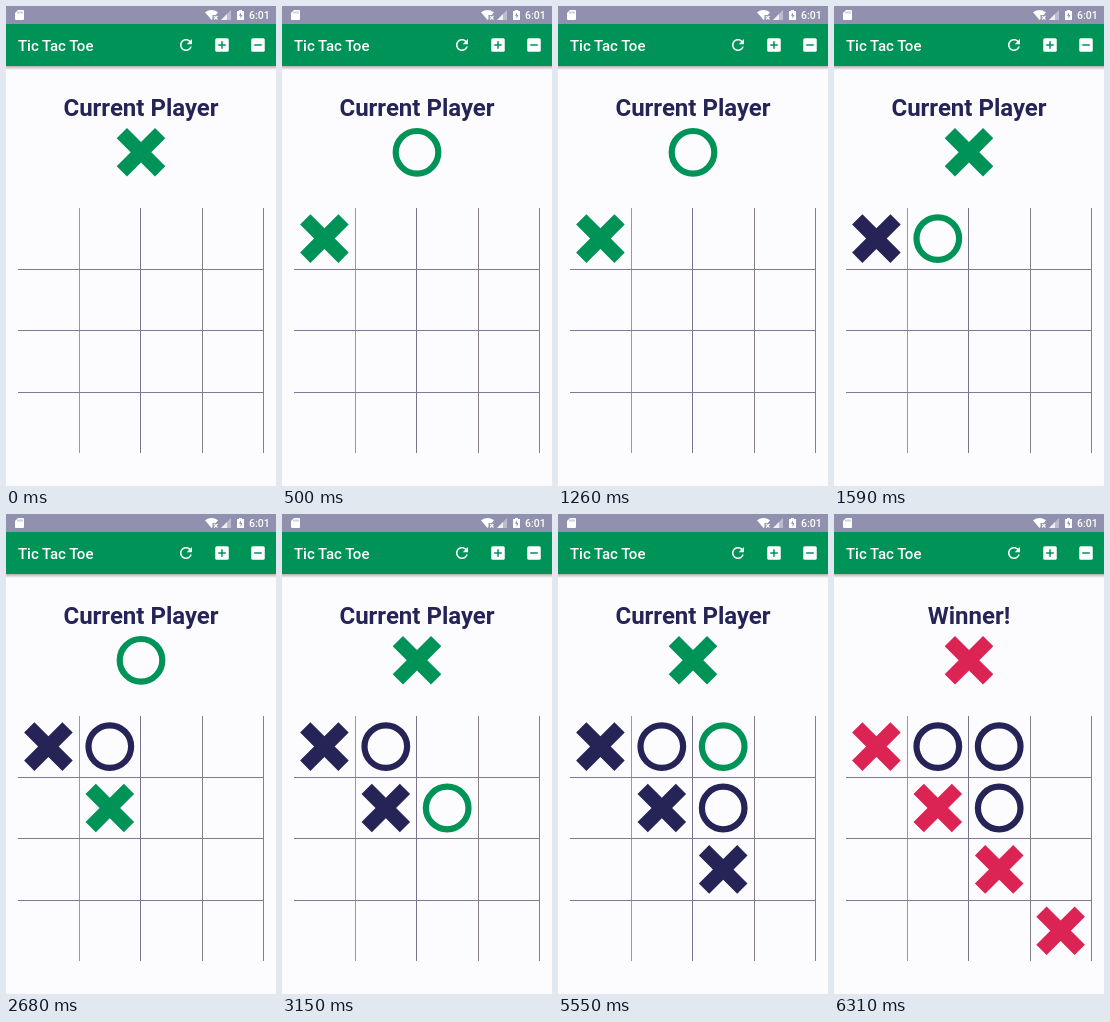
An HTML page that plays this animation: 270 px wide and 480 px high, repeating every 8 s.

```html
<!DOCTYPE html>
<html lang="en">
<head>
<meta charset="utf-8">
<title>Tic Tac Toe</title>
<style>
html, body { margin: 0; width: 100%; height: 100%; overflow: hidden; background: #fcfcff; }
svg { display: block; width: 100%; height: 100%; }
text { font-family: Roboto, sans-serif; }
</style>
</head>
<body>
<svg viewBox="0 0 270 480">
  <defs>
    <linearGradient id="shade" x2="0" y2="1">
      <stop stop-color="#000" stop-opacity=".3"/>
      <stop offset="1" stop-color="#000" stop-opacity="0"/>
    </linearGradient>
    <path id="x" d="M-24.3-14-14-24.3 0-10.3 14-24.3 24.3-14 10.3 0 24.3 14 14 24.3 0 10.3-14 24.3-24.3 14-10.3 0Z" fill="currentColor"/>
    <circle id="o" r="21.3" fill="none" stroke="currentColor" stroke-width="6.2"/>
  </defs>

  <rect width="270" height="480" fill="#fcfcff"/>
  <rect y="60" width="270" height="4" fill="url(#shade)"/>
  <rect width="270" height="18" fill="#9190ae"/>
  <rect y="18" width="270" height="42" fill="#009358"/>

  <!-- status bar -->
  <g fill="#fff">
    <path d="M12 4h5q1 0 1 1v8q0 1-1 1h-7q-1 0-1-1V7z"/>
    <path d="M12 5.5v2M14 5.5v2M16 5.5v2" stroke="#9190ae" stroke-width=".8"/>
    <path d="M199 6.3Q205.500 1.600 212 6.300L209.800 9H206.500V13L205.500 14Z"/>
    <path d="M208 10l3.500 3.500M211.500 10L208 13.500" stroke="#fff" stroke-width="1.100"/>
    <path d="M225 4v10h-10z" opacity=".4"/>
    <path d="M221 8v6h-6z" opacity=".75"/>
    <path d="M233 4h3v1h2v9h-7V5h2z"/>
    <path d="M235 6.300l-2 3.400h1.500v3l2-3.700H235z" fill="#9190ae"/>
    <text x="243" y="13" font-size="10.5" font-weight="500">6:01</text>
  </g>

  <!-- toolbar -->
  <g fill="#fff">
    <text x="12" y="45" font-size="15" font-weight="500">Tic Tac Toe</text>
    <path transform="translate(171 30) scale(.75)" d="M17.650 6.350C16.200 4.900 14.210 4 12 4c-4.420 0-7.990 3.580-7.990 8s3.570 8 7.990 8c3.730 0 6.840-2.550 7.730-6h-2.080c-.82 2.330-3.040 4-5.650 4-3.310 0-6-2.690-6-6s2.690-6 6-6c1.660 0 3.140.69 4.220 1.780L13 11h7V4z"/>
    <rect x="209.250" y="32.250" width="13.500" height="13.500" rx="1.500"/>
    <rect x="245.250" y="32.250" width="13.500" height="13.500" rx="1.500"/>
    <path d="M212.250 39h7.500M216 35.250v7.500M248.250 39h7.500" stroke="#009358" stroke-width="1.500"/>
  </g>

  <text id="label" x="135" y="110" font-size="24" font-weight="700" text-anchor="middle" fill="#262456"></text>
  <use id="turn" transform="translate(135 146.300)"/>

  <g fill="none" shape-rendering="crispEdges">
    <path d="M73.500 202V447" stroke="#928cf0"/>
    <path d="M134.500 202V447" stroke="#77738c"/>
    <path d="M196.500 202V447M257.500 202V447" stroke="#85807f"/>
    <path d="M12 263.500H258M12 324.500H258M12 386.500H258" stroke="#7c7a98"/>
  </g>
  <g id="board"></g>
</svg>
<script>
const LOOP = 8000, WIN = 6310;
const GREEN = '#009358', NAVY = '#262456', RED = '#dc2454';
// time, mark, column, row
const moves = [
  [500, 'x', 0, 0], [1590, 'o', 1, 0], [2680, 'x', 1, 1], [3150, 'o', 2, 1],
  [5550, 'x', 2, 2], [5550, 'o', 2, 0], [WIN, 'x', 3, 3]
];
const $ = id => document.getElementById(id);
const board = $('board'), turn = $('turn'), label = $('label');

const marks = moves.map(([, mark, col, row]) => {
  const el = document.createElementNS('http://www.w3.org/2000/svg', 'use');
  el.setAttribute('href', '#' + mark);
  el.setAttribute('transform', `translate(${42.4 + 61.4 * col} ${232.6 + 61.4 * row})`);
  return board.appendChild(el);
});

let shown = -1;
function draw(now) {
  const t = now % LOOP;
  const count = moves.filter(m => m[0] <= t).length;
  if (count !== shown) {
    shown = count;
    const won = count === moves.length;
    marks.forEach((el, i) => {
      el.style.display = i < count ? '' : 'none';
      el.style.color = won && moves[i][1] === 'x' ? RED : !won && i === count - 1 ? GREEN : NAVY;
    });
    label.textContent = won ? 'Winner!' : 'Current Player';
    turn.setAttribute('href', won || count % 2 === 0 ? '#x' : '#o');
    turn.style.color = won ? RED : GREEN;
  }
  requestAnimationFrame(draw);
}
draw(0);
</script>
</body>
</html>
```
